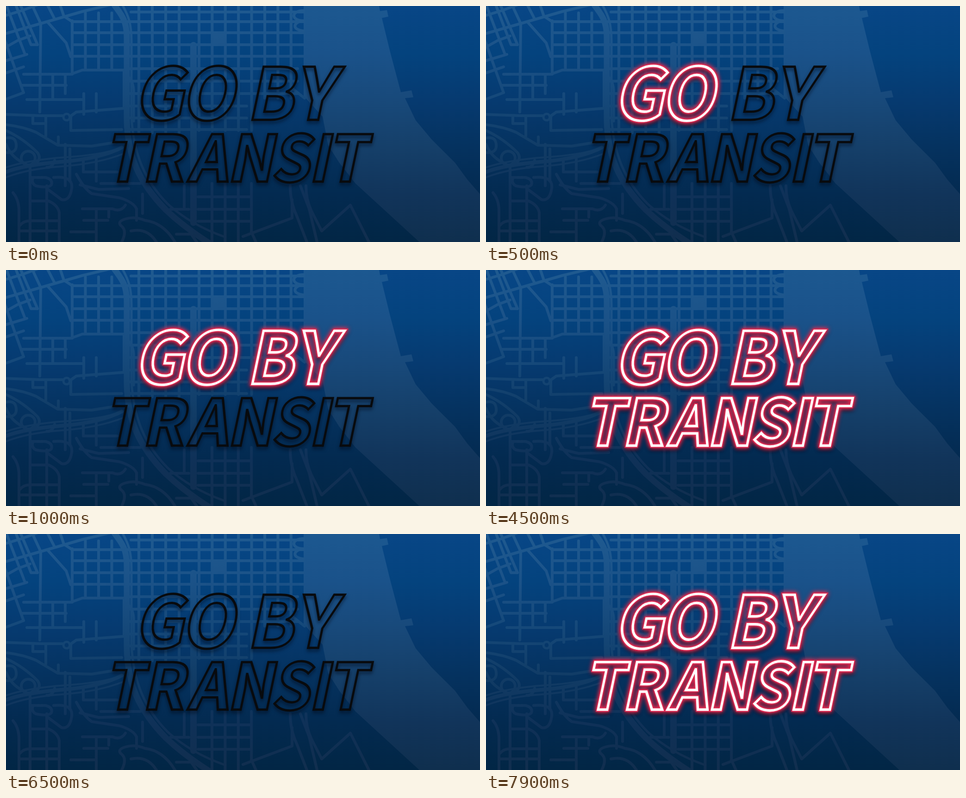
Write an HTML page with a canvas that moves like this. It is 1024 by 512 pixels and loops after 8.7 s.

```html
<!DOCTYPE html>
<html lang="en">
<head>
<meta charset="utf-8">
<title>Go by transit</title>
<style>
  html, body { margin: 0; width: 100%; height: 100%; overflow: hidden; background: #063160; }
  canvas { display: block; width: 1024px; height: 512px; }
</style>
</head>
<body>
<canvas id="stage" width="1024" height="512" role="img" aria-label="GO BY TRANSIT"></canvas>
<script>
const W = 1024, H = 512, LOOP = 8700;
const ctx = document.getElementById('stage').getContext('2d');
const FONT = '"Noto Sans CJK JP", "Noto Sans CJK SC", "Noto Sans CJK", "Open Sans", sans-serif';
const SLANT = 0.21, NARROW = 0.96;

// Each letter is [character, centre at the baseline].
const words = [
  { cap: 115, base: 246.5, on: 500, letters: [['G', 328], ['O', 434.5]] },
  { cap: 115, base: 246.5, on: 1000, letters: [['B', 573.5], ['Y', 664]] },
  { cap: 103, base: 381, on: 1500, letters: [
    ['T', 252], ['R', 342.5], ['A', 435], ['N', 526], ['S', 613.5], ['I', 674.5], ['T', 733]] }
];

function vertical(g, ...colors) {
  const fill = g.createLinearGradient(0, 0, 0, H);
  colors.forEach((c, i) => fill.addColorStop(i / (colors.length - 1), c));
  return fill;
}

function drawMap() {
  const map = document.createElement('canvas');
  map.width = W;
  map.height = H;
  const g = map.getContext('2d');
  const road = (d, width = 6) => {
    g.lineWidth = width;
    g.stroke(new Path2D(d));
  };
  const across = (y, x1, x2, w) => road(`M${x1} ${y}H${x2}`, w);
  const down = (x, y1, y2, w) => road(`M${x} ${y1}V${y2}`, w);

  g.fillStyle = vertical(g, '#084686', '#04437e', '#063a70', '#05325f', '#032a50', '#022645');
  g.fillRect(0, 0, W, H);

  // River with its two piers
  g.fillStyle = vertical(g, '#1c5890', '#1a528a', '#18497a', '#153f69', '#11345a', '#0f2f4e');
  g.fill(new Path2D('M643 0H806L808 11L823 9L826 23L812 26L830 100L853 187L876 183L880 198L862 200' +
    'L885 248L920 290L970 340L997 377L1024 408V512H893L755 385L720 340L696 302L684 240L643 195Z'));

  g.strokeStyle = vertical(g, '#1f5a90', '#1b5288', '#154879', '#113c66', '#0f3158', '#112e4e');
  g.lineCap = g.lineJoin = 'round';

  // Downtown blocks
  g.fillStyle = g.strokeStyle;
  g.fillRect(445, 58, 28, 26);
  for (let x = 143; x < 240; x += 28.5) down(x, x < 160 ? 32 : 15, 138);
  for (let x = 287; x < 380; x += 29) down(x, 0, 275);
  for (let x = 417; x < 640; x += 28.4) down(x, 0, x < 540 ? 270 : 200);
  for (const y of [34, 58, 84, 109]) across(y, 143, 643);
  across(13, 270, 643);
  for (const y of [136, 163, 190, 217, 243, 268]) across(y, 262, y < 200 ? 630 : 520);
  down(405, 85, 470, 14);
  for (let x = 445; x < 535; x += 28.4) down(x, 385, x > 520 ? 490 : 512);
  for (const y of [414, 441, 467]) across(y, 415, 530);
  down(385, 390, 440);
  across(441, 355, 395);
  road('M643 10C615 10 615 32 643 32M643 32C618 35 618 52 643 54M620 180L645 200');

  // Freeway
  road('M232 -5C248 18 260 28 261 65V245C262 330 290 385 345 442Q385 480 440 515', 13);
  road('M250 -5C264 20 271 38 271 75V240C275 320 300 380 350 430Q400 475 470 500', 5);
  road('M255 145Q278 160 276 190V250', 5);

  // Upper-left streets
  road('M-5 61L75 38L165 12L235 -5');
  road('M-5 22L34 10L75 -5M-5 92L25 75L52 65M-5 120L45 105M-5 147L38 132M-5 204L38 188');
  road('M2 2L40 102M-4 70L38 188M30 -5L68 84H54L20 -5M55 -5L75 38M88 -5L105 28M116 -5L125 22');
  road('M75 38L73 230M90 35L130 80L140 110M125 22L143 34');
  road('M38 148H140L165 139H255M35 172H130M45 203H168M101 148V202M128 148V190');
  road('M168 190V235M195 190V230M143 138V148M255 139V222');
  road('M-5 235L75 238H122M138 240L152 230L255 222M58 238V255H86V238M86 255V282');
  road('M124 241a7 7 0 1 0 14 0a7 7 0 1 0 -14 0', 5);
  road('M-5 257Q35 261 65 274L112 302L185 304L235 296M113 284V302M140 240V270L250 268');

  // Interchange
  road('M-5 362Q35 345 120 338T250 307', 8);
  road('M-5 352Q45 334 130 328T245 308', 4);
  road('M-5 374Q40 354 120 348T255 320', 4);
  road('M-5 288Q20 280 22 300T0 318M33 330a15 15 0 1 1 30 0a15 15 0 1 1 -30 0');
  road('M-5 268Q35 285 68 318Q78 332 62 344M0 300Q12 330 42 342');

  // Hillside streets
  road('M128 300V390M138 310V380M167 335V360H240M195 325V380M105 335Q100 352 88 350');
  road('M15 405Q28 420 28 445V512M52 350V512M30 476Q38 466 52 466H112');
  road('M52 372H85Q102 376 98 388Q92 396 64 390Q54 384 58 374');
  road('M55 423H92Q112 432 115 448V512M88 390V512M103 372Q145 368 142 395Q138 424 120 420L88 396');
  road('M152 365Q168 395 185 407L245 416Q275 425 282 440V465M160 388L200 398L265 396');
  road('M165 440H230Q248 448 258 432M195 440V512M168 465H220M222 440V458');
  road('M250 512Q262 488 250 478T258 462T300 465Q340 470 365 512M270 488Q305 480 325 512');
  road('M30 488H112M140 490H195M205 385H290M295 408V450M368 495H400L412 512');

  // Riverside streets
  road('M614 390Q614 425 628 455L650 512M648 390Q648 420 660 445L682 488L744 432L784 512');
  road('M512 500L618 460M530 490L540 512M618 460V420M636 390L655 440L672 512');
  return map;
}

function eachLetter(word, draw) {
  ctx.font = `bold 100px ${FONT}`;
  const size = word.cap / ctx.measureText('T').actualBoundingBoxAscent * 100;
  ctx.font = `bold ${size}px ${FONT}`;
  for (const [ch, x] of word.letters) {
    const m = ctx.measureText(ch);
    ctx.setTransform(NARROW, 0, -SLANT, 1, x, word.base);
    draw(ch, (m.actualBoundingBoxLeft - m.actualBoundingBoxRight) / 2);
  }
  ctx.setTransform(1, 0, 0, 1, 0, 0);
}

function outline(word, width, color, shadow = 'transparent', blur = 0, dy = 0) {
  ctx.save();
  ctx.lineWidth = width;
  ctx.lineJoin = 'miter';
  ctx.miterLimit = 4;
  ctx.strokeStyle = color;
  ctx.shadowColor = shadow;
  ctx.shadowBlur = blur;
  ctx.shadowOffsetY = dy;
  eachLetter(word, (ch, x) => ctx.strokeText(ch, x, 0));
  ctx.restore();
}

const map = drawMap();

function paint(lit) {
  ctx.drawImage(map, 0, 0);
  for (const word of words) outline(word, 5, '#080a0d', 'rgba(0,8,24,0.6)', 7, 5);
  for (const word of lit) outline(word, 8, '#300c20', 'rgba(10,6,20,0.7)', 9, 6);
  for (const word of lit) {
    for (const blur of [11, 9]) outline(word, 9, '#dc2a50', '#dc2a50', blur);
  }
  for (const word of lit) outline(word, 5.4, '#fff');
}

let shown = '';
function tick() {
  const t = performance.now() % LOOP;
  const flicker = t >= 6500 && t < 6700;
  const lit = flicker ? [] : words.filter(word => t >= word.on);
  const state = 'lit' + lit.length;
  if (state !== shown) {
    paint(lit);
    shown = state;
  }
  requestAnimationFrame(tick);
}
tick();
</script>
</body>
</html>
```
